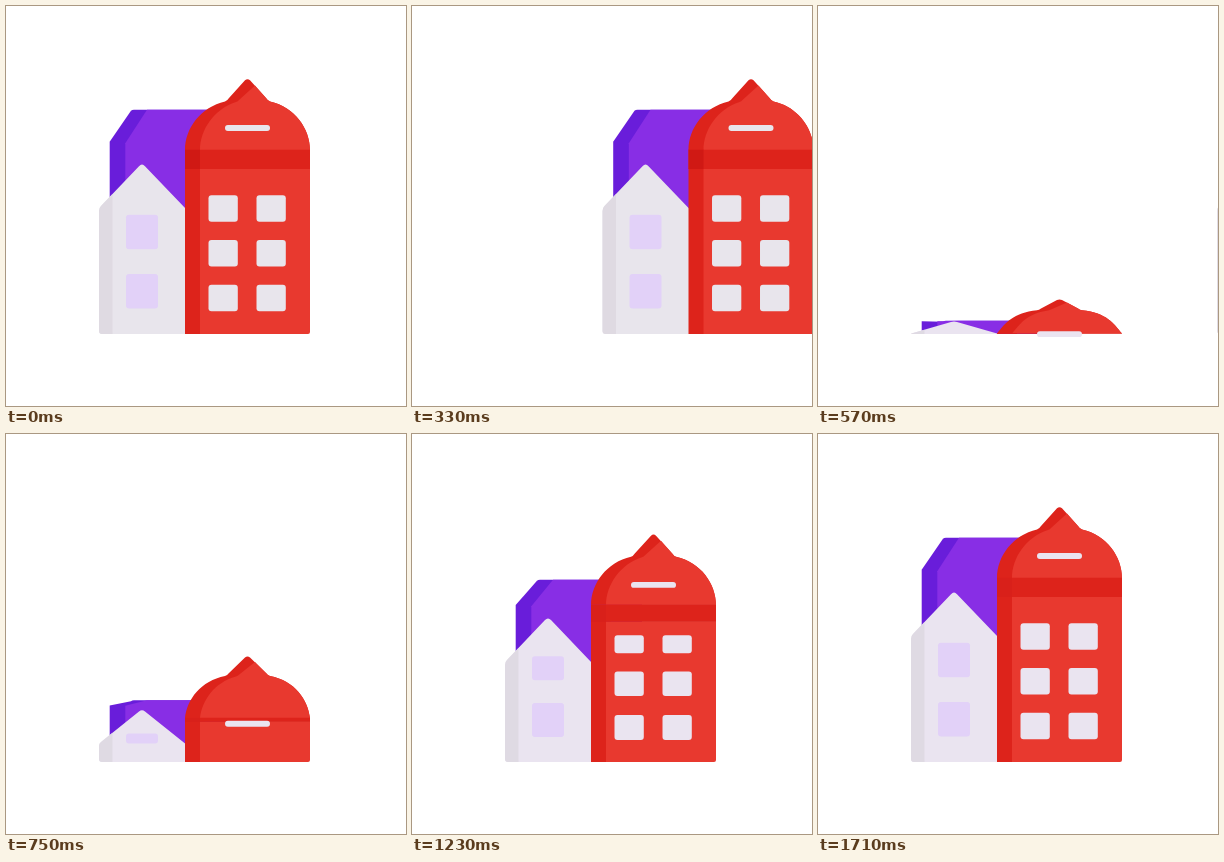
These frames come from a looping animation (400 by 400 pixels, 3740 ms). An HTML page:

```html
<!DOCTYPE html>
<html lang="en">
<head>
<meta charset="utf-8">
<title>Houses</title>
<style>
  html, body { margin: 0; width: 100%; height: 100%; overflow: hidden; background: #fff; }
  svg { display: block; width: 100%; height: 100%; }
</style>
</head>
<body>
<svg id="stage" viewBox="0 0 400 400"></svg>
<script>
const LOOP = 3740, GROUND = 328;
const stage = document.getElementById('stage');

// Smooth monotone curve through (times, values), held at both ends.
function track(times, values) {
  const n = times.length - 1;
  const slope = i => (values[i + 1] - values[i]) / (times[i + 1] - times[i]);
  const tangent = i => {
    if (i === 0) return slope(0);
    if (i === n) return 0;
    const a = slope(i - 1), b = slope(i);
    return a * b > 0 ? 2 * a * b / (a + b) : 0;
  };
  return t => {
    if (t <= times[0]) return values[0];
    if (t >= times[n]) return values[n];
    let i = 0;
    while (t > times[i + 1]) i++;
    const d = times[i + 1] - times[i], u = (t - times[i]) / d, v = 1 - u;
    return v * v * (1 + 2 * u) * values[i] + u * u * (3 - 2 * u) * values[i + 1]
      + d * u * v * (v * tangent(i) - u * tangent(i + 1));
  };
}

const early = [500, 570, 930, 1230, 1600];
const late = [510, 570, 930, 1230, 1710];

// Heights above the ground, or sizes of parts.
const parts = {
  dome: track(early, [0, 34, 73, 70.5, 71]),
  band: track(early, [0, 0, 10, 17, 19]),
  slot: track(early, [-0.2, -0.2, 100, 177, 206]),
  gable: track(late, [0, 12.4, 90, 144, 170]),
  roof: track(late, [0, 12, 44, 44, 44]),
  block: track(late, [0, 13, 111, 182, 224.3]),
  chamfer: track(late, [0, 0.5, 12, 25, 32])
};

const pane = (times, centers, heights) => ({ y: track(times, centers), h: track(times, heights) });
const redRows = [
  pane([790, 930, 1230, 1680], [314, 306.3, 293.5, 292], [0, 10.5, 25, 26.5]),
  pane([890, 930, 1230, 1680], [271, 268.5, 249.7, 247.3], [0, 2, 24.5, 26.5]),
  pane([1000, 1230, 1680], [233, 210.3, 202.5], [0, 18, 26.5])
];
const paleRows = [
  pane([640, 930, 1230, 1710], [312, 294, 286, 285.2], [0, 24, 34, 34.5]),
  pane([940, 1230, 1710], [255, 234.2, 226], [0, 24, 34.5])
];

const leaving = { pale: '#e8e5ec', shade: '#dfdae2', corner: '#d01914' };
const rising = { pale: '#eae4f0', shade: '#dfdae3', corner: '#d9201a' };

// Height of the red tip.
function tipHeight(t) {
  const u = Math.max(0, 1590 - t) / 1096;
  return Math.max(0, 255 * (1 - u * u));
}

const path = (d, fill) => `<path d="${d}" fill="${fill}"/>`;
const rect = (x, y, w, h, fill, r = 0) =>
  w > 0 && h > 0 ? `<rect x="${x}" y="${y}" width="${w}" height="${h}" rx="${r}" ry="${Math.min(r, h / 2)}" fill="${fill}"/>` : '';
const panes = (rows, t, xs, w, fill) => rows.map(row => {
  const h = row.h(t), y = row.y(t) - h / 2;
  return xs.map(x => rect(x, y, w, h, fill, 3)).join('');
}).join('');

function purpleBlock(t) {
  const top = GROUND - parts.block(t), c = parts.chamfer(t);
  return path(`M103.7 ${GROUND}V${top + c}L125 ${top + 1}Q126 ${top} 128 ${top}H230V${GROUND}Z`, '#691dda')
    + path(`M119.3 ${GROUND}V${top + c * 1.05}L141 ${top}H230V${GROUND}Z`, '#882ee5');
}

function paleHouse(t, { pale, shade }) {
  const top = GROUND - parts.gable(t), k = parts.roof(t) / 44;
  const y = d => Math.min(GROUND, top + d * k);
  const left = `L96 ${GROUND}Q93 ${GROUND} 93 ${Math.max(GROUND - 3, y(47))}V${y(47)}Q93 ${y(44)} 95 ${y(42)}`;
  return path(`M180 ${GROUND}${left}L133 ${y(2.2)}Q136 ${y(-1)} 139 ${y(2.2)}L180 ${y(45)}Z`, pale)
    + path(`M106.5 ${GROUND}${left}L106.5 ${y(30)}Z`, shade)
    + panes(paleRows, t, [120], 32, '#e2d1f8');
}

function redTower(t, { pale, corner }) {
  const size = parts.dome(t), tip = GROUND - tipHeight(t), base = tip + size;
  const k = size / 71, y = d => tip + d * k;
  const lean = 16 * Math.max(0, 1 - k);
  const band = parts.band(t), wall = base + band, tall = GROUND - wall;
  const right = `Q262 ${y(22)} 264 ${y(22.5)}C289 ${y(28)} ${304 - lean} ${y(50)} 304 ${base}`;
  return path(`M179 ${base}C${179 + lean} ${y(49)} 195 ${y(28)} 219 ${y(22.5)}Q221 ${y(22)} 223 ${y(19)}`
      + `L239 ${y(1.3)}Q241.5 ${y(-1)} 244 ${y(1.3)}L260 ${y(19)}${right}Z`, '#dd231b')
    + path(`M194 ${base}C${194 + lean} ${y(51)} 208 ${y(30)} 230 ${y(23)}Q232 ${y(22.5)} 233 ${y(21)}`
      + `L249 ${y(6.5)}L260 ${y(19)}${right}Z`, '#e8392f')
    + rect(179, wall - 0.3, 20, tall + 0.3, '#dd231b')
    + (tall > 3 ? path(`M194 ${wall - 0.3}H304V${GROUND - 2}Q304 ${GROUND} 302 ${GROUND}H194Z`, '#e8392f') : '')
    + rect(179, base - 0.3, 125, band + 0.3, '#dd231b')
    + rect(179, base - 0.3, 15, band + 0.3, corner)
    + rect(219, GROUND - parts.slot(t) - 2.9, 45, 5.8, pale, 2.9)
    + panes(redRows, t, [202.5, 250.5], 29.3, pale);
}

function houses(t, dx, colors) {
  return `<g transform="translate(${dx} 0)">`
    + purpleBlock(t) + paleHouse(t, colors) + redTower(t, colors) + '</g>';
}

function draw(t) {
  let out = '';
  if (t < 610) {
    const dx = 1440 * Math.sin(0.0009 * Math.max(0, t - 38.5)) ** 2;
    out += houses(LOOP, dx, leaving);
  }
  if (t > 500) out += houses(t, 0, rising);
  stage.innerHTML = out;
}

const start = performance.now();
function tick() {
  draw((performance.now() - start) % LOOP);
  requestAnimationFrame(tick);
}
tick();
</script>
</body>
</html>
```
